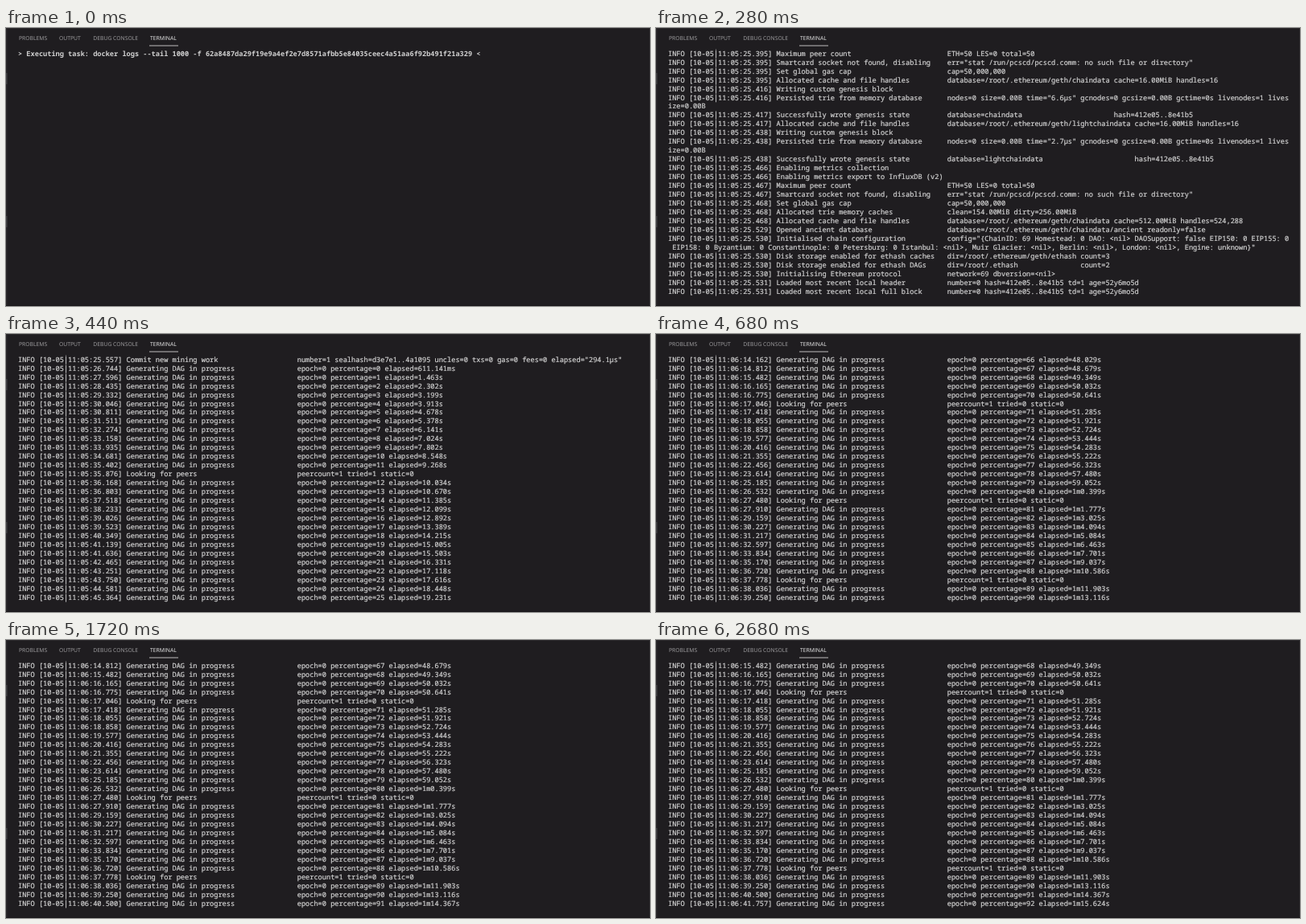
These frames come from a looping animation (800x346 px, 3560 ms). An HTML page:

```html
<!DOCTYPE html>
<html lang="en">
<head>
<meta charset="utf-8">
<title>Terminal log</title>
<style>
  html, body { margin: 0; width: 100%; height: 100%; overflow: hidden; background: #1f1d20; }
  svg { display: block; width: 100%; height: 100%; }
  text { text-rendering: geometricPrecision; white-space: pre; }
  .tab { font: 6.8px "Open Sans", "Noto Sans", sans-serif; fill: #a3a2a4; }
  .tab.on { fill: #f2f2f2; }
  .row {
    font: 8.63px "Noto Sans Mono", "DejaVu Sans Mono", monospace;
    font-variant-ligatures: none;
    fill: #d0d0d0; stroke: #d0d0d0; stroke-width: 0.22px;
  }
  .bold { font-weight: 700; stroke: none; }
</style>
</head>
<body>
<svg id="stage" viewBox="0 0 800 346" xmlns="http://www.w3.org/2000/svg">
  <rect width="800" height="346" fill="#1f1d20"/>
  <rect width="1.5" height="346" fill="#2a282b"/>
  <rect y="56" width="1.5" height="14" fill="#414043"/>
  <rect y="234" width="1.5" height="14" fill="#414043"/>
  <rect width="800" height="1" fill="#2b292c"/>
  <rect x="799" width="1" height="346" fill="#29272a"/>
  <rect y="345" width="800" height="1" fill="#19171a"/>
  <text class="tab" x="16" y="15">PROBLEMS</text>
  <text class="tab" x="66" y="15">OUTPUT</text>
  <text class="tab" x="108.3" y="15">DEBUG CONSOLE</text>
  <text class="tab on" x="179" y="15">TERMINAL</text>
  <rect x="178" y="21.6" width="36" height="0.8" fill="#e7e7e7"/>
  <g id="rows"></g>
</svg>
<script>
const LOOP = 3560, COLS = 149, MAX_ROWS = 29;
const LEFT = 15, BASE = 34.6, PITCH = 10.98;

// seconds after 11:05 | message | fields
const START = `
25.395|Maximum peer count|ETH=50 LES=0 total=50
25.395|Smartcard socket not found, disabling|err="stat /run/pcscd/pcscd.comm: no such file or directory"
25.395|Set global gas cap|cap=50,000,000
25.395|Allocated cache and file handles|database=/root/.ethereum/geth/chaindata cache=16.00MiB handles=16
25.416|Writing custom genesis block|
25.416|Persisted trie from memory database|nodes=0 size=0.00B time="6.6µs" gcnodes=0 gcsize=0.00B gctime=0s livenodes=1 livesize=0.00B
25.417|Successfully wrote genesis state|${'database=chaindata'.padEnd(40)}hash=412e05..8e41b5
25.417|Allocated cache and file handles|database=/root/.ethereum/geth/lightchaindata cache=16.00MiB handles=16
25.438|Writing custom genesis block|
25.438|Persisted trie from memory database|nodes=0 size=0.00B time="2.7µs" gcnodes=0 gcsize=0.00B gctime=0s livenodes=1 livesize=0.00B
25.438|Successfully wrote genesis state|${'database=lightchaindata'.padEnd(45)}hash=412e05..8e41b5
25.466|Enabling metrics collection|
25.466|Enabling metrics export to InfluxDB (v2)|
25.467|Maximum peer count|ETH=50 LES=0 total=50
25.467|Smartcard socket not found, disabling|err="stat /run/pcscd/pcscd.comm: no such file or directory"
25.468|Set global gas cap|cap=50,000,000
25.468|Allocated trie memory caches|clean=154.00MiB dirty=256.00MiB
25.468|Allocated cache and file handles|database=/root/.ethereum/geth/chaindata cache=512.00MiB handles=524,288
25.529|Opened ancient database|database=/root/.ethereum/geth/chaindata/ancient readonly=false
25.530|Initialised chain configuration|config="{ChainID: 69 Homestead: 0 DAO: <nil> DAOSupport: false EIP150: 0 EIP155: 0 EIP158: 0 Byzantium: 0 Constantinople: 0 Petersburg: 0 Istanbul: <nil>, Muir Glacier: <nil>, Berlin: <nil>, London: <nil>, Engine: unknown}"
25.530|Disk storage enabled for ethash caches|dir=/root/.ethereum/geth/ethash count=3
25.530|Disk storage enabled for ethash DAGs|${'dir=/root/.ethash'.padEnd(32)}count=2
25.530|Initialising Ethereum protocol|network=69 dbversion=<nil>
25.531|Loaded most recent local header|number=0 hash=412e05..8e41b5 td=1 age=52y6mo5d
25.531|Loaded most recent local full block|number=0 hash=412e05..8e41b5 td=1 age=52y6mo5d
25.531|Loaded most recent local fast block|number=0 hash=412e05..8e41b5 td=1 age=52y6mo5d
25.531|Regenerated local transaction journal|transactions=0 accounts=0
25.532|Gasprice oracle is ignoring threshold set|threshold=2
25.532|Error reading unclean shutdown markers|error="leveldb: not found"
25.532|Starting peer-to-peer node|instance=Geth/v1.10.9-stable-eae3b194/linux-amd64/go1.17.1
25.553|Mapped network port|proto=tcp extport=30303 intport=30303 interface=ExtIP(10.0.15.8)
25.554|Mapped network port|proto=udp extport=30303 intport=30303 interface=ExtIP(10.0.15.8)
25.554|New local node record|seq=1,633,431,925,554 id=5fd8dffb5918c563 ip=10.0.15.8 udp=30303 tcp=30303
25.555|Started P2P networking|self=enode://36ce0f1ba30e98c3679b2f5768676870d942a0eeba03f33f692f97fd46b068fe188bff224b9f8d60a009d9a48c540a14abd8c3f109de01fea775b569a68bea2e@10.0.15.8:30303
25.556|IPC endpoint opened|url=/root/.ethereum/geth.ipc
25.557|HTTP server started|endpoint=[::]:8545 prefix= cors=* vhosts=localhost
25.557|Transaction pool price threshold updated|price=1,000,000,000
25.557|Updated mining threads|threads=1
25.557|Transaction pool price threshold updated|price=1,000,000,000
25.557|Commit new mining work|number=1 sealhash=d3e7e1..4a1095 uncles=0 txs=0 gas=0 fees=0 elapsed="294.1µs"`;

// Elapsed ms for each percentage; the middle stretch is interpolated.
const DAG_T0 = 26133.6;
const EARLY = [611, 1463, 2302, 3199, 3913, 4678, 5378, 6141, 7024.5, 7802, 8548, 9268.5, 10034.5, 10670, 11385];
const LATE = [48029, 48679, 49349, 50032, 50641.5, 51285, 51921.5, 52724.5, 53444, 54283, 55222, 56323, 57480.5, 59052,
  60399, 61777, 63025.5, 64094, 65084, 66463.5, 67701, 69037, 70586.5, 71903, 73116.5, 74367, 75624];
const PEERS = [35876, 46031, 56214, 66630, 77046, 87480, 97778];

function elapsedAt(p) {
  if (p < 15) return EARLY[p];
  if (p > 65) return LATE[p - 66];
  return 11385 + (p - 14) * 704.7 + 120 * Math.sin(p * 2.1);
}

function span(e) {
  const ms = Math.floor(e);
  if (ms < 1000) return ms + '.141ms';
  const min = Math.floor(ms / 60000);
  return (min ? min + 'm' : '') + ((ms % 60000) / 1000).toFixed(3) + 's';
}

function line(ms, msg, fields) {
  const t = Math.floor(ms);
  const min = String(5 + Math.floor(t / 60000)).padStart(2, '0');
  const sec = ((t % 60000) / 1000).toFixed(3).padStart(6, '0');
  const level = msg.startsWith('Error') ? 'WARN' : 'INFO';
  return `${level} [10-05|11:${min}:${sec}] ${msg.padEnd(40)} ${fields}`;
}

function wrap(s) {
  const out = [];
  for (let i = 0; i < s.length; i += COLS) out.push(s.slice(i, i + COLS));
  return out;
}

function buildRows() {
  const intro = START.trim().split('\n').map(s => {
    const [sec, msg, fields] = s.split('|');
    return line(Math.round(sec * 1000), msg, fields);
  });
  const work = PEERS.map((t, i) => [t, 'Looking for peers', `peercount=1 tried=${i ? 0 : 1} static=0`]);
  for (let p = 0; p <= 92; p++) {
    const e = elapsedAt(p);
    work.push([DAG_T0 + e, 'Generating DAG in progress', `epoch=0 percentage=${p} elapsed=${span(e)}`]);
  }
  work.sort((a, b) => a[0] - b[0]);
  const command = '> Executing task: docker logs --tail 1000 -f 62a8487da29f19e9a4ef2e7d8571afbb5e84035ceec4a51aa6f92b491f21a329 <';
  return [command, '', ...[...intro, ...work.map(w => line(...w))].flatMap(wrap)];
}

const rows = buildRows(), total = rows.length;

// time, rows printed so far, rows in view
const STEPS = [
  [0, 1, 28], [160, 6, 28], [200, 13, 28], [240, 21, 28], [280, 30, 28], [320, 40, 28],
  [400, 62, 29], [440, 73, 28], [520, 95, 28], [600, 118, 28],
  [680, total - 2, 28], [1320, total - 1, 28], [2520, total, 28]
];

const group = document.getElementById('rows');
function add(tag, attrs) {
  const el = document.createElementNS('http://www.w3.org/2000/svg', tag);
  for (const k in attrs) el.setAttribute(k, attrs[k]);
  return group.appendChild(el);
}

const view = Array.from({ length: MAX_ROWS }, (_, i) => {
  const y = BASE + i * PITCH;
  return {
    bar: add('rect', { x: 74.15, y: y - 8.4, width: 0.8, height: PITCH, fill: '#cccccc', opacity: 0.6 }),
    text: add('text', { class: 'row', x: LEFT, y })
  };
});

let shown = null;
function draw(t) {
  const step = STEPS.findLast(s => s[0] <= t);
  if (step === shown) return;
  shown = step;
  const [, end, size] = step;
  const top = Math.max(0, end - size);
  view.forEach(({ bar, text }, i) => {
    const s = top + i < end ? rows[top + i] : '';
    text.textContent = s;
    text.setAttribute('class', s[0] === '>' ? 'row bold' : 'row');
    bar.setAttribute('visibility', s[11] === '|' ? 'visible' : 'hidden');
  });
}

const began = performance.now();
function tick() {
  draw((performance.now() - began) % LOOP);
  requestAnimationFrame(tick);
}
tick();
</script>
</body>
</html>
```
